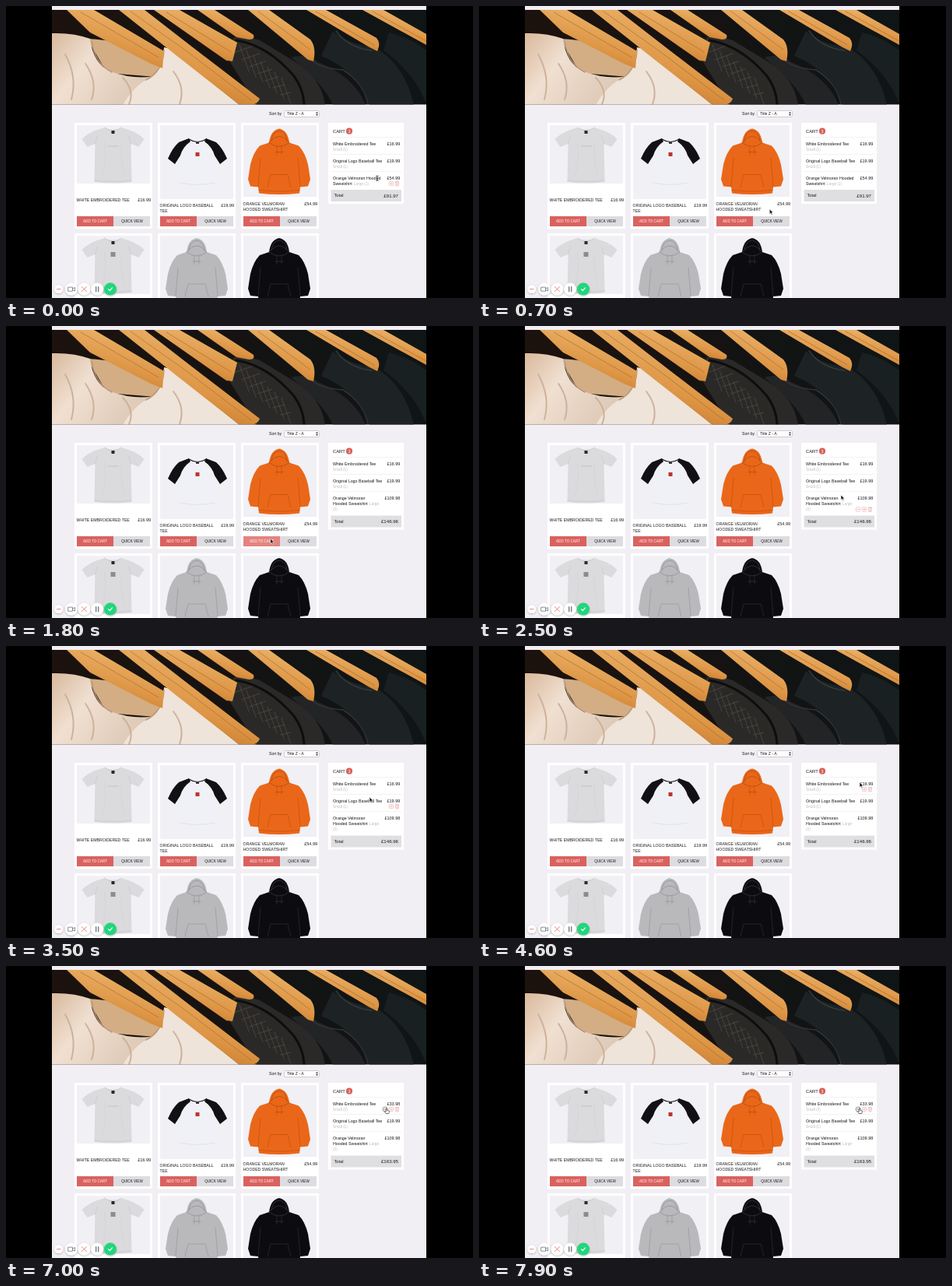
These frames come from a looping animation (600 by 375 pixels, 8000 ms). An HTML page:

```html
<!DOCTYPE html>
<html lang="en">
<head>
<meta charset="utf-8">
<title>Shop cart</title>
<style>
  html, body { margin: 0; width: 100%; height: 100%; overflow: hidden; background: #000; }
  svg { display: block; width: 100%; height: 100%; }
  text { font-family: "Liberation Sans", Arial, sans-serif; }
</style>
</head>
<body>
<svg viewBox="0 0 600 375">
  <defs>
    <linearGradient id="wood" x1="0" y1="1" x2=".5" y2="0">
      <stop offset="0" stop-color="#b5651f"/><stop offset=".5" stop-color="#dd9544"/><stop offset="1" stop-color="#ebb36b"/>
    </linearGradient>
    <linearGradient id="cream" x1="0" y1="0" x2="1" y2=".5">
      <stop offset="0" stop-color="#d9b99d"/><stop offset=".4" stop-color="#f0e0d1"/><stop offset="1" stop-color="#dcc6b3"/>
    </linearGradient>
    <linearGradient id="night">
      <stop offset="0" stop-color="#1d120d"/><stop offset=".6" stop-color="#131313"/><stop offset="1" stop-color="#0f1516"/>
    </linearGradient>
    <clipPath id="banner"><path d="M59 5H540V126.500H59Z"/></clipPath>
    <filter id="soft"><feGaussianBlur stdDeviation=".7"/></filter>
    <filter id="shade" x="-50%" y="-50%" width="200%" height="200%"><feDropShadow dx="0" dy=".8" stdDeviation="1" flood-opacity=".3"/></filter>
  </defs>
  <rect x="59" width="481" height="375" fill="#f1eff4"/>
  <g id="hero" clip-path="url(#banner)"></g>
  <g id="shop"></g>
  <g id="cart"></g>
  <g id="tools"></g>
  <g id="cursor"></g>
</svg>
<script>
const LOOP = 8000, INK = '#18171a', RED = '#d9625f', PALE = '#e9a6a6';
const put = (id, markup) => document.getElementById(id).innerHTML = markup;
const rect = (x, y, w, h, fill, r = 0) =>
  `<rect x="${x}" y="${y}" width="${w}" height="${h}" rx="${r}" fill="${fill}"/>`;
const shape = (d, fill) => `<path d="${d}" fill="${fill}"/>`;
const line = (d, color, width = .6) =>
  `<path d="${d}" fill="none" stroke="${color}" stroke-width="${width}" stroke-linecap="round" stroke-linejoin="round"/>`;
const disc = (x, y, r, fill, extra = '') => `<circle cx="${x}" cy="${y}" r="${r}" fill="${fill}" ${extra}/>`;
const text = (str, x, y, size, fill = INK, anchor = 'start') =>
  `<text x="${x}" y="${y}" font-size="${size}" text-anchor="${anchor}" fill="${fill}">${str}</text>`;
const at = (x, y, markup) => `<g transform="translate(${x} ${y})">${markup}</g>`;

function hero() {
  const hanger = d => shape(d, 'url(#wood)');
  let stitches = '';
  for (let i = 0; i < 7; i++)
    stitches += line(`M${293 + i * 10} ${60 + i * 9}l${25 - i * 2} ${-9 + i}M${300 + i * 9} ${50 + i * 7}l12 34`, '#5a554e');
  const folds = [[76, 62, 58], [102, 74, 46], [150, 92, 34], [215, 84, 42]]
    .map(([x, y, h]) => line(`M${x} ${y}q16 ${h / 2} 8 ${h}`, '#cdb29c', 2)).join('');
  put('hero', rect(59, 5, 481, 122, 'url(#night)') + `<g filter="url(#soft)">` +
    // light shirts
    shape('M104 42Q150 44 195 62L205 92L130 86Z', '#d3ae84') +
    shape('M59 35Q86 34 108 42Q112 74 134 84Q165 95 190 90L205 127H59Z', 'url(#cream)') +
    shape('M203 53Q214 54 224 66L300 127H150Q166 100 186 92Q202 82 203 53Z', '#efe4da') + folds +
    line('M203 56Q202 84 180 95M110 45Q114 74 136 85', '#b9977c', 1.5) +
    // dark garments
    shape('M292 41Q303 37 326 44L372 72Q405 92 410 127H322L288 72Z', '#2b2927') + stitches +
    line('M296 44Q337 51 370 90Q382 106 383 126', '#0e0d0e', 3) +
    shape('M366 66Q388 60 401 72Q448 91 462 127H420Q407 98 366 66Z', '#232425') +
    line('M393 70Q405 80 433 82Q460 99 465 126', '#333435', 1.5) +
    shape('M420 32Q440 50 472 52Q512 74 524 127H467Q455 85 405 64Z', '#1d2324') +
    line('M424 32Q440 54 470 57', '#333b3b', 1.5) +
    shape('M492 34Q518 40 540 57V126Q525 86 485 57Z', '#182021') +
    // hangers
    hanger('M78 5H113L203 58L201 80L186 74L108 34Z') +
    hanger('M145 5H178L236 50L326 119Q324 126 314 127H300L222 66Z') +
    hanger('M190 5H223L297 47L291 71L283 70Z') +
    hanger('M246 5H268L318 37Q320 43 312 43L296 40Z') +
    hanger('M311 5H338L391 43Q399 53 395 71L388 69Z') +
    hanger('M386 5H411L476 41Q482 48 477 58L467 53Z') +
    hanger('M458 5H485L540 36V50Z') +
    line('M96 8L196 66M160 7L232 58L315 121M206 8L289 59M324 7L391 56M398 7L473 50M471 7L540 45', '#a8652a') +
    '</g>');
}

function tee(mark) {
  return shape('M-11 0Q0 5 11 0L23 4Q33 8 40 15L33 25L23 21L24 70Q0 73-24 70L-23 21L-33 25L-40 15Q-33 8-23 4Z', '#dbdbdd') +
    line('M-11 0Q0 9 11 0M-23 21L-20 11M23 21L20 11M-24 68Q0 71 24 68', '#c4c4c8') +
    line('M-11 18Q-8 42-14 62M11 20Q9 42 15 60', '#d0d0d3') + rect(-2, 4, 4, 4, '#282729') + mark;
}
function raglan() {
  return shape('M-12 1Q0 6 12 1L22 22L22 57Q0 62-22 57L-22 22Z', '#f0f1f6') +
    shape('M-11 0L-24 5Q-32 12-38 26L-29 33L-22 22Q-19 11-9 4ZM11 0L24 5Q32 12 38 26L29 33L22 22Q19 11 9 4Z', '#111114') +
    line('M-11 1Q0 8 11 1', '#111114', 1.2) + line('M-22 57Q0 62 22 57', '#d7d7da') +
    rect(-2, 4, 4, 3, '#38383b') + rect(-2.5, 18, 5, 5, '#b93430');
}
function hoodie(color, fold) {
  return shape('M0 0Q-11 2-13 18L-25 22Q-33 30-37 46L-40 65L-37 74L-27 75L-26 83Q0 86 26 83L27 75L37 74L40 65L37 46Q33 30 25 22L13 18Q11 2 0 0Z', color) +
    line('M-10 16Q-9 4 0 3Q9 4 10 16M-13 18Q-6 10 0 10Q6 10 13 18Q0 28-13 18', fold, .8) +
    line('M-24 38L-27 74M24 38L27 74M-26 79Q0 82 26 79M-15 75L-11 59H11L15 75M-3 23V34M3 23V33', fold) +
    line('M-5 30H5', fold, .8);
}

function card(x, y, imageHeight, clothing, clothingX, clothingY) {
  return rect(x, y, 100, Math.min(136, 375 - y), '#fff', 1) + rect(x + 3, y + 3, 94, imageHeight, '#f1f0f5') +
    at(clothingX, clothingY, clothing);
}
function label(x, baseline, lines, price) {
  return lines.map((s, i) => text(s, x + 2.6, baseline + i * 7, 5.2)).join('') +
    text(price, x + 98, baseline - .3, 5.5, INK, 'end') +
    rect(x + 3, 270, 47, 13, RED) + rect(x + 50, 270, 47, 13, '#dddce0') +
    text('ADD TO CART', x + 26.5, 278.2, 4.6, '#fff', 'middle') +
    text('QUICK VIEW', x + 74, 278.2, 4.6, INK, 'middle');
}

function shop() {
  put('shop',
    text('Sort by', 338, 140.3, 5.1) + rect(357.5, 134.5, 45, 8, '#aaa9ad', 1.5) + rect(358, 135, 44, 7, '#fff', 1.2) +
    text('Title Z - A', 361, 140.4, 5.1) + shape('M398 138l1.500-2 1.500 2ZM398 139l1.500 2 1.500-2Z', '#303033') +
    card(88, 150, 75, tee(line('M-6 24H7', '#b1b1b5')), 137.5, 156) +
    card(195, 150, 95, raglan(), 246, 170) +
    card(302, 150, 92, hoodie('#ea6719', '#b94c0c'), 351, 157.5) +
    label(88, 251, ['WHITE EMBROIDERED TEE'], '£16.99') +
    label(195, 258, ['ORIGINAL LOGO BASEBALL', 'TEE'], '£19.99') +
    label(302, 256, ['ORANGE VELMORAN', 'HOODED SWEATSHIRT'], '£54.99') +
    card(88, 292, 75, tee(rect(-3, 18, 6, 6, '#8c8c90')), 137.5, 298) +
    card(195, 292, 92, hoodie('#b9b8bb', '#929196'), 245, 298) +
    card(302, 292, 92, hoodie('#0c0c10', '#34343a'), 351, 298));
}

function tools() {
  const button = (x, r, fill) => disc(x, 363.6, r, fill, 'filter="url(#shade)"');
  put('tools', button(67.7, 5.4, '#fff') + button(84, 8, '#fff') + button(100.5, 8, '#fff') +
    button(117.2, 8, '#fff') + button(134, 8, '#20d67c') +
    line('M65.500 363.600h4.500M97.500 360.600l6 6m0-6l-6 6', '#e57868', .9) +
    line('M80 361.200h5.500v5H80ZM85.500 363l3-1.500v4.500l-3-1.500', '#77777c', .8) +
    line('M115.700 360.700v6M118.700 360.700v6', '#66666b', 1.2) +
    line('M131.500 363.700l1.800 1.900 3.200-3.700', '#fff', 1.2));
}

// Pointer stops: time, x, y.
const stops = [
  [0, 477, 221], [250, 477, 221], [950, 331, 277], [1700, 331, 277], [2350, 465, 217], [3100, 465, 217],
  [3400, 467, 194], [4150, 467, 194], [4500, 489, 175], [4700, 489, 175], [4950, 495, 184], [5450, 495, 184],
  [5750, 486, 185], [6500, 486, 185], [7000, 489, 184], [8000, 489, 184]];

function pointer(t) {
  const i = stops.findIndex(s => s[0] > t);
  const [t0, x0, y0] = stops[i - 1], [t1, x1, y1] = stops[i];
  const p = (t - t0) / (t1 - t0), k = p * p * (3 - 2 * p);
  return { x: x0 + (x1 - x0) * k, y: y0 + (y1 - y0) * k };
}

function rowIcons(y, quantity, mouse) {
  const icon = (x, glyph) => {
    const color = Math.hypot(mouse.x - x, mouse.y - y) < 4 ? '#55555a' : PALE;
    return at(x, y, disc(0, 0, 3, 'none', `stroke="${color}" stroke-width=".6"`) + line(glyph, color));
  };
  const bin = at(502.5, y, line('M-2.500-2H2.500M-1-2v-1H1v1M-2-1.500L-1.600 3H1.600L2-1.500M-.6-.5V2M.6-.5V2', PALE));
  return (quantity > 1 ? icon(487, 'M-1.500 0h3') : '') + icon(495, 'M-1.500 0h3M0-1.500v3') + bin;
}

function cart(t, mouse) {
  const twoHoodies = t >= 1650, twoTees = t >= 5300, extra = twoHoodies ? 7.5 : 0;
  const grey = '#bdbac1', over = (top, bottom) => mouse.x > 414 && mouse.y >= top && mouse.y < bottom;
  const price = (s, y) => text(s, 506.3, y, 5.5, INK, 'end');
  const total = twoTees ? '£163.95' : twoHoodies ? '£146.96' : '£91.97';
  let out = rect(414, 150, 97, 104 + extra, '#fff', 1.5) + text('CART', 420, 163, 5.8) +
    disc(441, 160.7, 4.1, RED) + text('3', 441, 162.5, 4.8, '#fff', 'middle') +
    line('M418 168.500H508M418 190.500H508M418 212.500H508', '#ebeaee') +
    text('White Embroidered Tee', 420, 179, 5.3) + text(`Small (${twoTees ? 2 : 1})`, 420, 186, 4.7, grey) +
    price(twoTees ? '£33.98' : '£16.99', 178.8) +
    text('Original Logo Baseball Tee', 420, 201, 5.3) + text('Small (1)', 420, 208, 4.7, grey) + price('£19.99', 200.8);
  out += twoHoodies
    ? text('Orange Velmoran', 420, 223, 5.3) + text('Hooded Sweatshirt', 420, 230, 5.3) +
      text('Large', 467, 230, 4.7, grey) + text('(2)', 420, 237, 4.7, grey) + price('£109.98', 222.8)
    : text('Orange Velmoran Hooded', 420, 223, 5.3) + text('Sweatshirt', 420, 230, 5.3) +
      text('Large (1)', 447, 230, 4.7, grey) + price('£54.99', 222.8);
  out += rect(417.5, 236 + extra, 90.5, 15, '#dfdfe2') + text('Total', 421.5, 245.4 + extra, 5.7) +
    text(total, 504, 245.5 + extra, 6.1, INK, 'end');
  if (over(168, 190)) out += rowIcons(184, twoTees ? 2 : 1, mouse);
  if (over(190, 212)) out += rowIcons(206, 1, mouse);
  if (over(212, 236 + extra)) out += rowIcons(228 + extra, twoHoodies ? 2 : 1, mouse);
  if (mouse.x > 305 && mouse.x < 352 && mouse.y > 270 && mouse.y < 283)
    out += rect(305, 270, 47, 13, '#e5837f') + text('ADD TO CART', 328.5, 278.2, 4.6, '#fff', 'middle');
  put('cart', out);
}

function cursor(t, { x, y }) {
  const outlined = (d, fill, stroke) => `<path d="${d}" fill="${fill}" stroke="${stroke}" stroke-width=".6" stroke-linejoin="round"/>`;
  const hand = (t > 850 && t < 1750) || t > 4850;
  const glyph = t < 300 ? line('M-1.300-3Q0-3 0-2Q0-3 1.300-3M0-2V3M-1.300 3.500Q0 3.500 0 2.500Q0 3.500 1.300 3.500', '#18181a', .7)
    : hand ? outlined('M-.8-1Q0-2 .8-1V1.500L3 2Q3.800 2.400 3.400 3.800L2.600 5.500H-.8L-2.600 3.200Q-2.700 2.200-.8 3Z', '#fff', '#17171a')
    : outlined('M0 0V6.500L1.600 5.100L2.700 7.600L3.800 7.100L2.700 4.700H4.700Z', '#111', '#fff');
  put('cursor', at(x, y, glyph));
}

function draw() {
  const t = performance.now() % LOOP, mouse = pointer(t);
  cart(t, mouse);
  cursor(t, mouse);
  requestAnimationFrame(draw);
}

hero();
shop();
tools();
draw();
</script>
</body>
</html>
```
